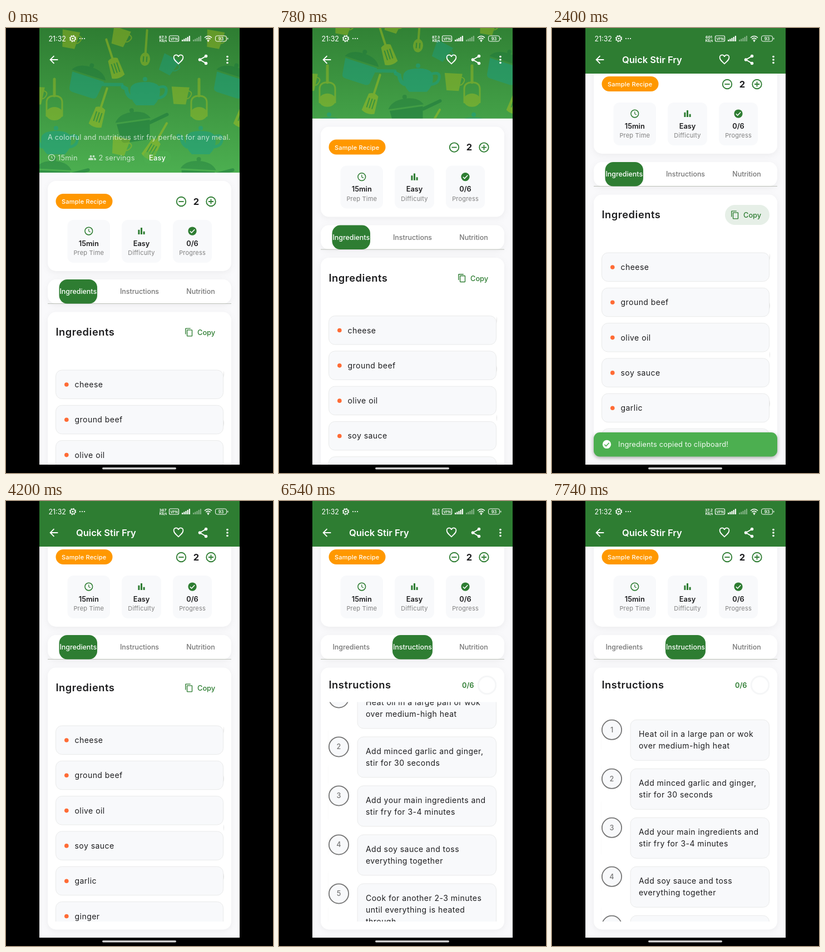
Recreate the animation shown at these times as an HTML page. Size 480 by 800 pixels, loop 8 s.

```html
<!DOCTYPE html>
<html lang="en">
<head>
<meta charset="utf-8">
<title>Recipe screen</title>
<style>
html, body { margin: 0; height: 100%; overflow: hidden; background: #000; }
svg { display: block; width: 100vw; height: 100vh; font-family: Inter, Roboto, sans-serif; }
text { white-space: pre; }
.card { fill: #fff; filter: drop-shadow(0 3px 6px rgba(0,0,0,.05)); }
.box { fill: #f8f9fb; stroke: #e9eaea; }
</style>
</head>
<body>
<svg id="stage" viewBox="0 0 480 800"></svg>
<script>
const GREEN = '#2e7d32', GRAY = '#757575', INK = '#1d1d1f';
const TEAL = '#17a08c', LIME = '#b4c41c', MOSS = '#14703c';
const MAX_SCROLL = 211, COLLAPSE = 178, LOOP = 8000;

const text = (x, y, s, size, fill, extra = '') =>
  `<text x="${x}" y="${y}" font-size="${size}" fill="${fill}" ${extra}>${s}</text>`;
const mid = 'text-anchor="middle" ';
const weight = (w, ls = 0) => `font-weight="${w}" letter-spacing="${ls}" `;
const rect = (x, y, w, h, r, attrs) =>
  `<rect x="${x}" y="${y}" width="${w}" height="${h}" rx="${r}" ${attrs}/>`;
const circle = (x, y, r, attrs = '') => `<circle cx="${x}" cy="${y}" r="${r}" ${attrs}/>`;
const line = (d, attrs = '') => `<path d="${d}" ${attrs}/>`;
const clip = (id, x, y, w, h) => `<clipPath id="${id}">${rect(x, y, w, h, 0, '')}</clipPath>`;

// Icons live on a 24-unit grid centred at (x, y)
const solid = 'fill="currentColor" stroke="none"';
const glyphs = {
  back: line('M20 12H5M12.5 4.5L5 12l7.5 7.5'),
  heart: line('M12 20C6 14.6 3 12 3 8.5A4.6 4.6 0 0 1 12 6.2A4.6 4.6 0 0 1 21 8.5C21 12 18 14.6 12 20z'),
  share: line('M18 5L6 12l12 7') + [[18, 5], [6, 12], [18, 19]].map(p => circle(...p, 3, solid)).join(''),
  more: [6, 12, 18].map(y => circle(12, y, 2, solid)).join(''),
  clock: circle(12, 12, 9) + line('M12 7v5.3l4 2.4', 'stroke-width="1.6"'),
  people: circle(8, 8, 3, solid) + circle(16, 8, 3, solid) +
    line('M1 19v-2.5q0-4 7-4t7 4V19zM16.5 19h6.5v-2.5q0-3.5-7-4 1.5 1.5 1.5 4z', solid),
  bars: line('M4 9h4v11H4zM10 4h4v16h-4zM16 13h4v7h-4z', solid),
  minus: circle(12, 12, 9) + line('M7 12h10'),
  plus: circle(12, 12, 9) + line('M7 12h10M12 7v10'),
  copy: rect(7, 6, 13, 16, 1, '') + line('M3 17V3q0-1 1-1h12'),
  done: circle(12, 12, 10, solid) + line('M6.5 12.3l3.7 3.7 7.3-7.6', 'class="tick"')
};
const icon = (name, x, y, size, color, tick = '#fff') =>
  `<g transform="translate(${x - size / 2} ${y - size / 2}) scale(${size / 24})" color="${color}"
    fill="none" stroke="currentColor" stroke-width="2">${
    glyphs[name].replace('class="tick"', `stroke="${tick}"`)}</g>`;

// Kitchen pattern behind the header
const tool = (x, y, turn, color, alpha, body) =>
  `<g transform="translate(${x} ${y}) rotate(${turn})" fill="${color}" stroke="${color}"
    stroke-width="0" opacity="${alpha}">${body}</g>`;
const thin = w => `fill="none" stroke-width="${w}" stroke-linecap="round"`;
const slits = d => line(d, 'fill="none" stroke="#2f8a38" stroke-width="2"');
const cup = (x, y, a, c = LIME) => tool(x, y, a, c, .4,
  line('M-16-15h32l-5 31h-22z') + line('M14-9q9 2 5 9t-8 5', thin(2)));
const pot = (x, y, a, c = TEAL) => tool(x, y, a, c, .45,
  line('M-30-9h60l-4 29q-1 6-8 6h-36q-7 0-8-6z') + line('M30-4l32-10', thin(6)) +
  tool(0, 0, 0, MOSS, .8, line('M-32-12q8-15 32-15t32 15z') + circle(0, -30, 4)));
const teapot = (x, y) => tool(x, y, 0, TEAL, .5,
  line('M-26-8q4-10 26-10t26 10q4 18-10 32h-32q-14-14-10-32z') + circle(0, -23, 4) +
  line('M-25 10q-8-4-9-16l-6-3', thin(7)) + line('M24-8q16-5 14 7t-18 12', thin(5)));
const spatula = (x, y, a) => tool(x, y, a, LIME, .45,
  line('M-9-16q9-6 18 0l3 32q-12 6-24 0z') + line('M0-18V-54', thin(4)) + slits('M-5-9v18M0-9v18M5-9v18'));
const ladle = (x, y) => tool(x, y, 4, LIME, .4,
  '<ellipse rx="9" ry="12"/>' + line('M0-10V-52', thin(4)) + slits('M-3-5v10M3-5v10'));
const masher = (x, y) => tool(x, y, 0, LIME, .4,
  line('M0-14V-44', thin(5)) + line('M-14 22V-2q0-12 14-12t14 12v24', thin(3)) +
  '<ellipse cy="18" rx="15" ry="12"/>');
const tile = dx => `<g transform="translate(${dx} 0)">` +
  cup(205, 16, 18) + cup(375, 20, 10) + ladle(250, 56) + spatula(197, 72, -18) + pot(145, 96, 18) +
  cup(292, 66, 28, TEAL) + teapot(250, 115) + cup(313, 121, 3) + masher(347, 136) + spatula(165, 160, 18) +
  pot(230, 178, -8, MOSS) + teapot(350, 203) + cup(205, 212, 12) + spatula(262, 218, 30) +
  pot(345, 266, 3, MOSS) + '</g>';

const header = `
  ${rect(60, 0, 360, 260, 0, 'fill="url(#sky)"')}
  ${[-260, 0, 260].map(tile).join('')}
  ${text(75, 201, 'A colorful and nutritious stir fry perfect for any meal.', 12.8, '#fff', 'opacity=".7" ' + weight(400, .2))}
  <g opacity=".7">${icon('clock', 82, 233, 15, '#fff')}${icon('people', 155, 233, 15, '#fff')}
  ${text(93, 237.5, '15min', 12.8, '#fff', weight(400, .2))}
  ${text(166.5, 237.5, '2 servings', 12.8, '#fff', weight(400, .2))}</g>
  ${rect(247, 221, 50, 23, 11, 'fill="#4caf50" opacity=".45"')}
  ${text(257, 237.5, 'Easy', 12.8, '#fff', weight(500, .2))}`;

const signal = (x, alpha) => `<g fill="#fff" opacity="${alpha}">` +
  [3, 4.5, 6, 8, 10].map((h, i) => rect(x + i * 3.2, 24 - h, 2.2, h, .5, '')).join('') + '</g>';
const statusIcons = `
  ${text(76.5, 24, '21:32', 12.4, '#fff')}
  ${circle(120, 19, 4.3, 'fill="none" stroke="#fff" stroke-width="1.6"')}
  ${circle(120, 19, 5.6, 'fill="none" stroke="#fff" stroke-width="1.2" stroke-dasharray="2.2 2.2"')}
  ${circle(120, 19, 1.5, 'fill="#fff"')}
  ${[133, 137, 141].map(x => circle(x, 19, 1.1, 'fill="#fff"')).join('')}
  <g font-weight="700">${text(282, 19, '', 6.8, '#fff', mid + 'id="speed"')}
  ${text(282.5, 25, 'KB/s', 5.8, '#fff', mid)}</g>
  ${rect(293.5, 14, 17, 10, 2, 'fill="none" stroke="#fff" stroke-width="1.2"')}
  ${text(302, 21.5, 'VPN', 6.4, '#fff', mid + weight(600))}
  ${signal(316, 1)}${signal(336, .4)}
  <g fill="none" stroke="#fff" stroke-width="1.5">${line('M357 17.5q6.5-6 13 0M359.3 20q4.2-3.8 8.4 0M361.5 22.3q2-1.7 4 0')}</g>
  ${circle(363.5, 23.8, 1.2, 'fill="#fff"')}
  ${rect(376.5, 14, 20, 10, 3, 'fill="none" stroke="#fff"')}
  ${rect(398, 17.5, 1.3, 3, .6, 'fill="#fff"')}
  ${text(386.5, 21.8, '93', 7.6, '#fff', mid + weight(600))}`;

const stat = (x, w, name, value, label) => rect(x, 345, w, 77, 11, 'fill="#f8f9fb"') +
  icon(name, x + w / 2, 365, 18.3, GREEN) +
  text(x + w / 2, 391.5, value, 12.8, INK, mid + weight(600)) +
  text(x + w / 2, 408, label, 11, '#808080', mid + weight(400, .18));

const tabs = [[129.8, 'Ingredients'], [240, 'Instructions'], [350, 'Nutrition']];
const heading = (y, s) => text(89.5, y, s, 18.3, INK, weight(600, .55));

const foods = ['cheese', 'ground beef', 'olive oil', 'soy sauce', 'garlic', 'ginger'];
const ingredients = heading(342, 'Ingredients') +
  rect(311, 318, 80, 36, 18, 'id="press" fill="#e6efe7"') +
  icon('copy', 329, 336, 16.5, GREEN) + text(344, 341, 'Copy', 12.8, GREEN, weight(500)) +
  foods.map((s, i) => {
    const y = 404 + i * 63.3;
    return rect(89.5, y, 301, 51.5, 11, 'class="box"') + circle(108.8, y + 26, 3.8, 'fill="#ff6b35"') +
      text(123.5, y + 31, s, 14, INK, weight(400, .46));
  }).join('');

const steps = ['Heat oil in a large pan or wok|over medium-high heat',
  'Add minced garlic and ginger,|stir for 30 seconds',
  'Add your main ingredients and|stir fry for 3-4 minutes',
  'Add soy sauce and toss|everything together',
  'Cook for another 2-3 minutes|until everything is heated|through',
  'Serve hot over rice or noodles'];
let nextY = 393.3;
const stepRows = steps.map((s, i) => {
  const rows = s.split('|'), y = nextY, h = 31 + rows.length * 21;
  nextY += h + 15;
  return rect(141, y, 249.5, h, 11, 'class="box"') +
    circle(107.5, y + 18, 17.6, `fill="#f8f9fb" stroke="${GRAY}" stroke-width="1.8"`) +
    text(107.5, y + 22.5, i + 1, 12.6, GRAY, mid + weight(500)) +
    rows.map((r, j) => text(156, y + 31 + j * 21, r, 14, INK, weight(400, .46))).join('');
}).join('');
const instructions = heading(336.5, 'Instructions') +
  text(329, 335.5, '0/6', 12.8, GREEN, weight(600)) +
  circle(374, 331, 15.8, 'fill="none" stroke="#f5f6f7" stroke-width="3"') +
  `<g clip-path="url(#listClip)"><g id="stepList">${stepRows}</g></g>`;

const page = `
  ${rect(75, 275, 330, 162, 15, 'class="card"')}
  ${rect(89.5, 298, 102, 27, 13.5, 'fill="#ff9800"')}
  ${text(100, 316, 'Sample Recipe', 11, '#fff', weight(500, .2))}
  ${icon('minus', 315, 312, 22, GREEN)}${icon('plus', 368.5, 312, 22, GREEN)}
  ${text(342, 317.5, '2', 16.5, INK, mid + weight(700))}
  ${stat(110.5, 76.5, 'clock', '15min', 'Prep Time')}
  ${stat(208, 71, 'bars', 'Easy', 'Difficulty')}
  ${stat(300, 70, 'done', '0/6', 'Progress')}
  ${rect(75, 452, 330, 43.5, 15, 'class="card"')}
  ${line('M75 495.5H405', 'stroke="#bcc0b8"')}
  ${rect(95.5, 452, 68.5, 43.5, 14.7, `id="marker" fill="${GREEN}"`)}
  ${tabs.map(([x, s], i) => text(x, 478, s, 12.4, GRAY, mid + weight(500) + `id="tab${i}"`)).join('')}
  ${rect(75, 510.5, 330, 471, 15, 'class="card"')}
  <g transform="translate(0 ${MAX_SCROLL})"><g clip-path="url(#panelClip)">
    <g id="panelA">${ingredients}</g><g id="panelB">${instructions}</g>
  </g></g>`;

const snack = rect(75, 727, 330, 43.5, 11, 'fill="#4caf50" style="filter:drop-shadow(0 2px 3px rgba(0,0,0,.3))"') +
  icon('done', 98.5, 748.5, 18.3, '#fff', '#4caf50') +
  text(119, 753, 'Ingredients copied to clipboard!', 12.8, '#f4fbf4', weight(400, .2));

document.getElementById('stage').innerHTML = `
  <defs>
    <linearGradient id="sky" x2="0" y2="1"><stop stop-color="${GREEN}"/><stop offset="1" stop-color="#4caf50"/></linearGradient>
    ${clip('screenClip', 60, 0, 360, 785)}${clip('panelClip', 88.8, 300, 302.4, 456)}
    ${clip('listClip', 80, 361.5, 320, 394.5)}
    <clipPath id="headClip"><rect id="headRect" x="60" width="360"/></clipPath>
  </defs>
  <g clip-path="url(#screenClip)">
    ${rect(60, 0, 360, 785, 0, 'fill="#f9f9fb"')}
    <g id="page">${page}</g>
    <g clip-path="url(#headClip)">
      ${rect(60, 0, 360, 260, 0, `fill="${GREEN}"`)}
      <g id="head">${header}</g>
    </g>
    ${icon('back', 86, 57, 22, '#fff')}${icon('heart', 310, 57, 22, '#fff')}
    ${icon('share', 354, 57, 22, '#fff')}${icon('more', 398, 57, 22, '#fff')}
    ${text(126, 63, 'Quick Stir Fry', 16.5, '#fff', weight(600) + 'id="title"')}
    ${statusIcons}
    <g id="snack">${snack}</g>
  </g>
  ${rect(173, 790, 133, 3.5, 1.7, 'fill="#d0d0d0"')}`;

const ramp = (t, a, b) => Math.min(1, Math.max(0, (t - a) / (b - a)));
const ease = (t, a, b) => (1 - Math.cos(Math.PI * ramp(t, a, b))) / 2;
const set = (id, name, value) => document.getElementById(id).setAttribute(name, value);
const move = (id, x, y) => set(id, 'transform', `translate(${x} ${y})`);
const tabColor = k => {
  const v = Math.round(117 + 138 * k);
  return `rgb(${v},${v},${v})`;
};

function draw(now) {
  const t = now % LOOP;

  const scroll = MAX_SCROLL * ease(t, 20, 1620);
  const fold = Math.min(scroll, COLLAPSE);
  const fade = ramp(fold, COLLAPSE - 51, COLLAPSE);
  move('page', 0, -scroll);
  set('headRect', 'height', 260 - fold);
  move('head', 0, -fold / 4);
  set('head', 'opacity', 1 - fade);
  set('title', 'opacity', fade);

  set('press', 'opacity', t < 2400 ? 0 : 1 - ramp(t, 2400, 3000));
  set('snack', 'opacity', t < 2400 ? 0 : 1 - ramp(t, 3740, 3840));

  const tab = ease(t, 5110, 5400);
  set('marker', 'x', 95.5 + 108.5 * tab);
  set('marker', 'width', 68.5 + 3.5 * tab);
  set('tab0', 'fill', tabColor(1 - tab));
  set('tab1', 'fill', tabColor(tab));
  move('panelA', -302 * tab, 0);
  move('panelB', 302 * (1 - tab), 0);
  move('stepList', 0, -165 * (ease(t, 6260, 6960) - ease(t, 7090, 7740)));

  document.getElementById('speed').textContent =
    t < 1800 ? '87.3' : t < 3360 ? '601' : t < 5760 ? '367' : '37.2';
  requestAnimationFrame(draw);
}
draw(performance.now());
</script>
</body>
</html>
```
